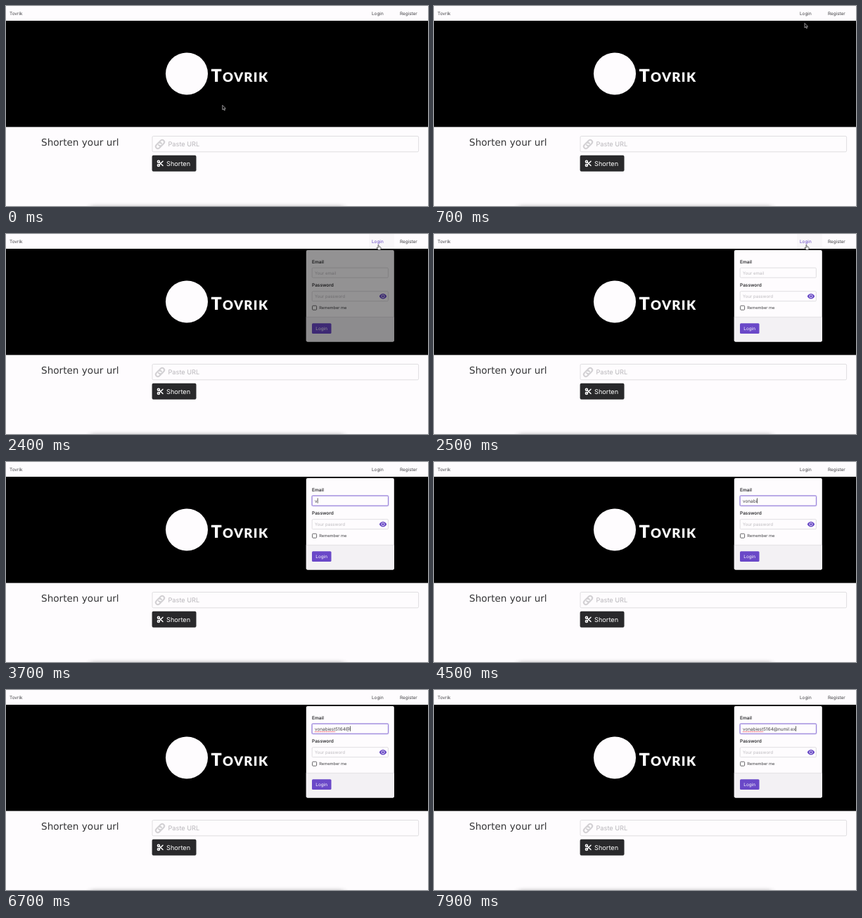
Write an HTML page that moves like this. It is 600x285 px and loops after 8 s.

```html
<!DOCTYPE html>
<html lang="en">
<head>
<meta charset="utf-8">
<title>Tovrik</title>
<style>
  html, body { margin: 0; width: 100%; height: 100%; overflow: hidden; background: #fefcfe; }
  svg { display: block; width: 600px; height: 285px; }
  text { font: 6.4px Inter, Roboto, sans-serif; fill: #3f3f42; text-rendering: geometricPrecision; white-space: pre; }
  .label { font-weight: 600; font-size: 6.5px; fill: #303033; }
  .hint { font-size: 6.1px; fill: #bdbbbf; }
  .big { font-size: 9.2px; }
  .light { fill: #fff; }
  .title { font: 13.6px Verdana, "DejaVu Sans", sans-serif; fill: #363638; }
  .brand { font: 900 25px Lato, sans-serif; fill: #fff; letter-spacing: 1.3px; }
  .brand tspan { font-size: 18.5px; }
  .field { fill: #fefcfe; stroke: #d9d7da; stroke-width: .8; }
  .icon { fill: none; stroke-linecap: round; }
</style>
</head>
<body>
<svg viewBox="0 0 600 285">
  <defs>
    <filter id="soft" x="-10%" y="-200%" width="120%" height="500%">
      <feGaussianBlur stdDeviation="4 2.6"/>
    </filter>
  </defs>
  <rect width="600" height="285" fill="#fefcfe"/>

  <!-- header -->
  <rect id="hover" x="516" width="36" height="21" fill="#f9f7f9"/>
  <text x="5" y="12.8">Tovrik</text>
  <text id="login" x="520" y="12.8">Login</text>
  <text x="560" y="12.8">Register</text>

  <!-- banner -->
  <rect y="21" width="600" height="151.4"/>
  <circle cx="257" cy="96.5" r="30" fill="#fefcfe"/>
  <text class="brand" x="291.5" y="107.8">T<tspan>OVRIK</tspan></text>

  <!-- shorten form -->
  <text class="title" x="50" y="199">Shorten your url</text>
  <rect class="field" x="208" y="185.5" width="378.6" height="22.3" rx="1.6"/>
  <g class="icon" transform="translate(219 197) rotate(-45) scale(1.15)" stroke="#d3d1d4" stroke-width="1.8">
    <path d="M-1 2.6H-3.8A2.6 2.6 0 0 1-3.8-2.6H-.6A2.6 2.6 0 0 1 1.8.6"/>
    <path d="M1-2.6H3.8A2.6 2.6 0 0 1 3.8 2.6H.6A2.6 2.6 0 0 1-1.8-.6"/>
  </g>
  <text class="big" x="230.5" y="200.3" style="fill:#b9b7bb">Paste URL</text>
  <rect x="207.6" y="212.7" width="62.9" height="23.1" rx="2" fill="#29292b"/>
  <g class="icon" stroke="#fff" stroke-width="1.5">
    <circle cx="216.9" cy="221.7" r="1.5"/>
    <circle cx="216.9" cy="227" r="1.5"/>
    <path d="M218.2 222.7L223 227.5M218.2 226L223 221.2"/>
  </g>
  <text class="big light" x="228" y="227.7">Shorten</text>
  <rect x="120" y="284.5" width="360" height="8" opacity=".22" filter="url(#soft)"/>

  <!-- login panel -->
  <g id="panel">
    <rect x="426.8" y="23" width="125" height="130.6" rx="2" fill="#fefcfe"/>
    <path d="M426.8 118.4h125v33.2a2 2 0 0 1-2 2h-121a2 2 0 0 1-2-2z" fill="#f3f1f4"/>
    <path d="M426.8 118.4h125" stroke="#dddbde" stroke-width=".7"/>
    <text class="label" x="435" y="42.1">Email</text>
    <rect id="ring" x="434.6" y="47.6" width="109.4" height="15.2" rx="1.8" fill="none" stroke="#d8d0f2" stroke-width="1.4"/>
    <rect id="email" class="field" x="435.2" y="48.2" width="108.2" height="14" rx="1.3"/>
    <text id="hint" class="hint" x="439" y="57.6">Your email</text>
    <text id="typed" x="439" y="57.6"></text>
    <path id="wave" stroke="#e8404a" stroke-width=".9" stroke-dasharray="1.1 .5"/>
    <rect id="caret" y="51.4" width=".7" height="7.4" fill="#222"/>
    <text class="label" x="435" y="75.3">Password</text>
    <rect class="field" x="435.2" y="81.7" width="108.2" height="14" rx="1.3"/>
    <text class="hint" x="439" y="91">Your password</text>
    <path d="M530.8 88.7C533 83.7 539 83.7 541.2 88.7C539 93.7 533 93.7 530.8 88.7z" fill="#6545c4"/>
    <circle cx="536" cy="88.7" r="2.1" fill="#6545c4" stroke="#fff" stroke-width=".8"/>
    <rect x="435.6" y="102.2" width="6" height="6" rx="1" fill="#fff" stroke="#58565a" stroke-width=".9"/>
    <text x="445.3" y="107.4" style="font-size:5.7px">Remember me</text>
    <rect x="435" y="127.2" width="27.5" height="14.8" rx="1.5" fill="#6a48c8"/>
    <text class="light" x="440.3" y="136.8">Login</text>
  </g>

  <!-- pointers, each with its hot spot at 0,0 -->
  <path id="arrow" d="M0 0V6.4L1.5 5.1L2.5 7.4L3.6 6.9L2.6 4.7H4.5z" fill="#000" stroke="#d4d2d4" stroke-width=".7"/>
  <path id="hand" d="M-.5.3Q0-.4.5.3V2.7L3.1 3.3Q3.8 3.6 3.6 4.5L3 7.1H-.5L-2.5 4.3Q-2.3 3.4-1.5 4L-.5 4.7z" fill="#fff" stroke="#333" stroke-width=".7"/>
  <path id="beam" d="M-1.8-6Q0-6 0-4.8Q0-6 1.8-6M0-5V5M-1.8 6Q0 6 0 4.8Q0 6 1.8 6" fill="none" stroke="#222" stroke-width=".8"/>
</svg>
<script>
const LOOP = 8000, TICK = 100;
const ADDRESS = "vonabiest5164@numil.ex";
const NAME_LENGTH = 9;

// time, pointer shape, x, y
const MOVES = [
  [0, "arrow", 307.8, 141.4], [100, "arrow", 350, 108], [200, "arrow", 446, 52],
  [300, "arrow", 499, 26.3], [500, "arrow", 505, 19], [600, "arrow", 511, 11],
  [700, "arrow", 527, 24.5], [1600, "arrow", 527, 23.8], [1700, "arrow", 527, 22.5],
  [1800, "hand", 529.3, 19], [1900, "hand", 529.4, 17.2], [2000, "hand", 529.4, 16],
  [2100, "hand", 529.5, 15.3], [2600, "arrow", 524, 26], [2700, "arrow", 505, 38],
  [2800, "beam", 480, 52], [2900, "beam", 458, 55], [3000, "beam", 445, 55],
  [3100, "beam", 438, 54], [3700, "none", 0, 0]
];

// moment of each key press
const KEYS = [
  3700, 3900, 4100, 4200, 4300, 4500, 4600, 4700, 4900,
  5500, 5600, 6000, 6300, 6600, 6900, 7000, 7100, 7200, 7300,
  7600, 7700, 7800
];
const OPEN = 2400, FOCUS = 3200, SPELL = 6700, BLINK = 500;

const $ = id => document.getElementById(id);
const show = (id, on) => $(id).style.display = on ? "" : "none";

function drawPointer(t) {
  const [, shape, x, y] = MOVES.filter(m => m[0] <= t).pop();
  for (const id of ["arrow", "hand", "beam"]) show(id, id === shape);
  if (shape !== "none") $(shape).setAttribute("transform", `translate(${x} ${y})`);
  const over = shape === "hand";
  show("hover", over);
  $("login").style.fill = over ? "#6545c4" : "";
}

function drawPanel(t) {
  show("panel", t >= OPEN);
  if (t < OPEN) return;
  $("panel").style.opacity = t < OPEN + TICK ? .58 : 1;

  const focus = t >= FOCUS;
  show("ring", focus);
  $("email").style.stroke = focus ? "#7c5fd0" : "";

  const pressed = KEYS.filter(k => k <= t);
  const count = pressed.length;
  const typed = $("typed");
  typed.textContent = ADDRESS.slice(0, count);
  show("hint", !count);

  const width = count ? typed.getComputedTextLength() : 0;
  const idle = t - (pressed.pop() || FOCUS);
  $("caret").setAttribute("x", 439.2 + width);
  show("caret", focus && idle % (2 * BLINK) < BLINK);

  const marked = t >= SPELL;
  show("wave", marked);
  if (marked) $("wave").setAttribute("d", `M439 59.4h${typed.getSubStringLength(0, NAME_LENGTH)}`);
}

const start = performance.now();
function frame() {
  const now = Math.max(0, performance.now() - start) % LOOP;
  const t = Math.floor(now / TICK) * TICK;
  drawPointer(t);
  drawPanel(t);
  requestAnimationFrame(frame);
}
frame();
</script>
</body>
</html>
```
